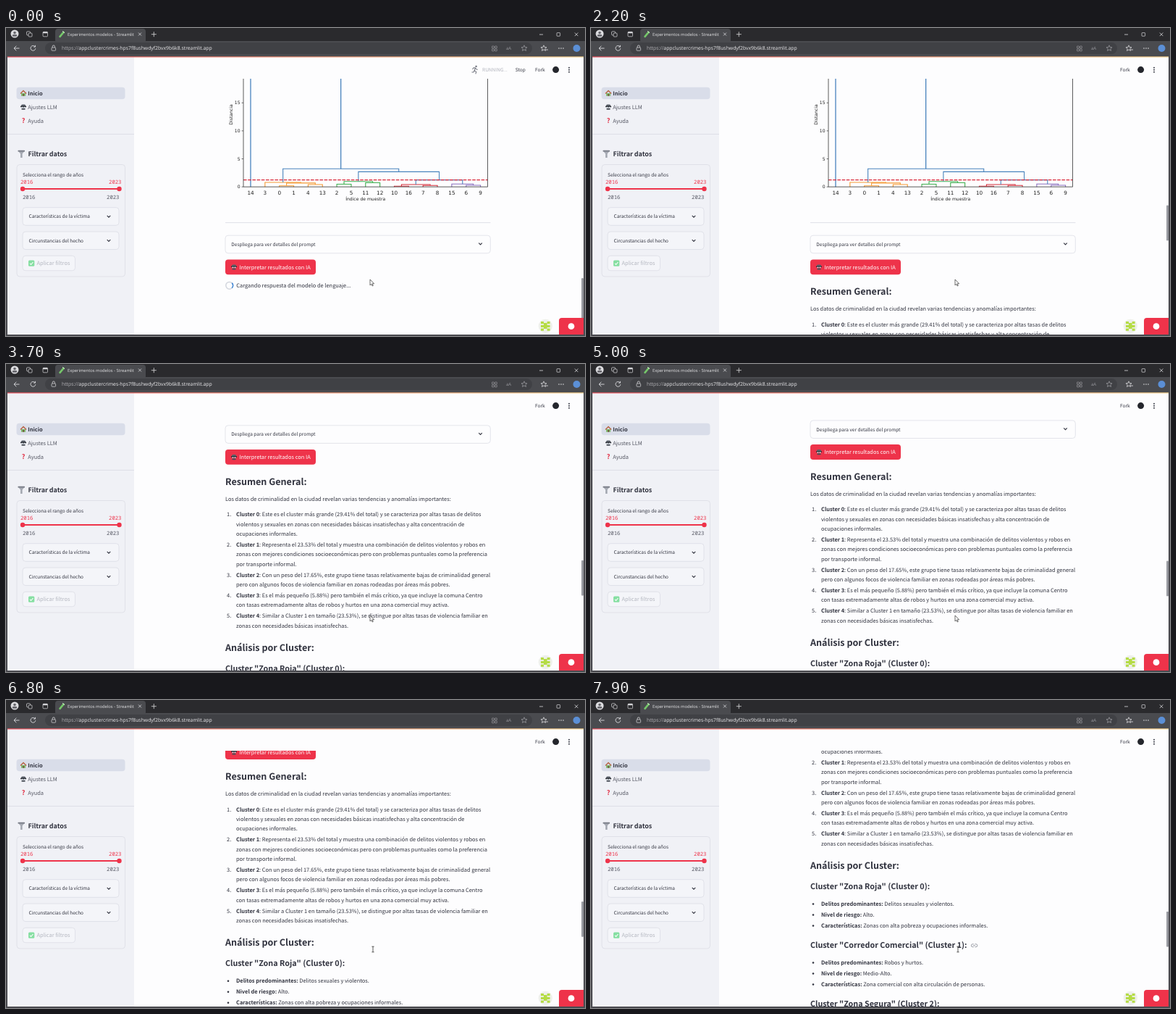
Write an HTML page that moves like this. It is 800 by 425 pixels and loops after 8000 ms.

```html
<!DOCTYPE html>
<html lang="es">
<head>
<meta charset="utf-8">
<title>Experimentos modelos</title>
<style>
  html, body { margin: 0; width: 100%; height: 100%; overflow: hidden; background: #fdfdfe; }
  svg { display: block; width: 800px; height: 425px; text-rendering: geometricPrecision; }
  .sans { font-family: "Noto Sans CJK JP", "Noto Sans CJK SC", "Noto Sans CJK", "Noto Sans", sans-serif; }
  .ui { font-family: "Open Sans", "Noto Sans", sans-serif; }
  .mono { font-family: "Noto Sans Mono", "Liberation Mono", monospace; }
  .plot { font-family: "DejaVu Sans", sans-serif; }
  .b { font-weight: 600; }
  .mid { text-anchor: middle; }
  .end { text-anchor: end; }
</style>
</head>
<body>
<svg id="stage" viewBox="0 0 800 425" xmlns="http://www.w3.org/2000/svg"></svg>
<script>
const INK = '#31333f', RED = '#ee334a', EDGE = '#d8dae2';
const LOOP = 8000, NOTCH = 41.66, NOTCH_MS = 300, ANSWER_AT = 2100;
const BODY = 8.33, SMALL = 7.29, H2 = 14.05, H3 = 12.03;

// Shape helpers. Text is placed by its visual centre line.
const label = (font, x, y, s, size, fill, cls = '') =>
  `<text class="${font} ${cls}" x="${x}" y="${y}" font-size="${size}" fill="${fill}">${s}</text>`;
const sans = (x, y, s, size = BODY, fill = INK, cls = '') =>
  label('sans', x, y + size * .33, s, size / 1.117, fill, cls);
const ui = (x, y, s, size, fill) => label('ui', x, y + size * .36, s, size, fill);
const mono = (x, y, s, fill, cls) => label('mono', x, y + 2.5, s, SMALL, fill, cls);
const plotText = (x, y, s, size, cls) => label('plot', x, y + size * .365, s, size, '#222', cls);
const rect = (x, y, w, h, fill, rx = 0, stroke = 'none') =>
  `<rect x="${x}" y="${y}" width="${w}" height="${h}" rx="${rx}" fill="${fill}" stroke="${stroke}" stroke-width=".7"/>`;
const dot = (x, y, r, fill) => `<circle cx="${x}" cy="${y}" r="${r}" fill="${fill}"/>`;
const line = (d, stroke, w = 1, extra = '') =>
  `<path d="${d}" fill="none" stroke="${stroke}" stroke-width="${w}" ${extra}/>`;
const bold = s => `<tspan class="b">${s}</tspan>`;
const chevron = (x, y) => line(`M${x - 2.3} ${y - 1.2}l2.3 2.3 2.3-2.3`, INK, 1.1);

function robot(x, y) {
  return rect(x - 3, y - 3.3, 6, 4.2, '#5c626c', 1.5) + rect(x - 4.1, y - 1.2, 8.2, 1.6, '#33363d', .6) +
    dot(x - 1.5, y + .8, .9, '#e8f0f5') + dot(x + 1.5, y + .8, .9, '#e8f0f5') +
    rect(x - 2.6, y + 1.9, 5.2, 2, '#4a4f58', .8);
}

function browser() {
  const bar = '#2a2a2d', tool = '#4a4b4f', pill = '#404145', pale = '#dcdcdf', dim = '#98989d';
  return rect(0, 0, 800, 40, bar) + rect(0, 18, 800, 22, tool) +
    rect(68, 1, 125, 20, tool, 4) + rect(54, 20, 673, 16, pill, 8) +
    dot(12, 8, 5.5, '#dcdcdf') + dot(12, 6.6, 1.8, '#66666c') + rect(8.8, 9, 6.4, 2.8, '#66666c', 1.4) +
    rect(28.5, 4.8, 5, 5, 'none', 1, pale) + rect(31, 7, 5, 5, bar, 1, pale) +
    rect(51, 5.3, 6.5, 6.5, 'none', 1, pale) + rect(51, 5.3, 6.5, 2, pale, .8) +
    line('M74.5 11.8l5-6', '#75c66a', 2.6, 'stroke-linecap="round"') + line('M78 4.3l3 2.5', '#dff0dc', 1) +
    ui(85, 8.7, 'Experimentos modelos - Streamlit', 5.82, '#e6e6e8') +
    line('M183 6.5l4 4m0-4l-4 4M200.8 8.7h7M204.3 5.2v7', pale, .8) +
    line('M737 9h5M785.8 6.5l4.6 4.6m0-4.6l-4.6 4.6', pale, .8) + rect(761, 6.6, 4.6, 4.6, 'none', .6, pale) +
    line('M18.5 28h-7.5m3.3-3.3l-3.3 3.3 3.3 3.3', pale, .9) +
    line('M40 25.6a3.4 3.4 0 1 0 .8 2.6M40.5 23.8v2.3h-2.4', pale, .9) +
    rect(63, 27, 5.6, 4.2, 'none', .7, pale) + line('M64.2 27v-1.5a1.6 1.6 0 0 1 3.2 0v1.5', pale, .8) +
    ui(77, 28, '<tspan fill="#b4b4b8">https://</tspan>appclustercrimes-hps7f8ushwdyf2bvx9b6k8.streamlit.app', 6.85, '#ececee') +
    [[671.5, 25], [675.5, 25], [671.5, 29], [675.5, 29]].map(([x, y]) => rect(x, y, 2.8, 2.8, 'none', .3, dim)).join('') +
    ui(691, 28, 'aA', 6, dim) + star(716, 28, dim) + star(743, 28, pale) + line('M745.5 30h3.5', pale, .8) +
    [-3, 0, 3].map(d => dot(767 + d, 28, .8, pale)).join('') + dot(788.5, 28, 5, '#5b8fd6');
}

function star(x, y, stroke) {
  const pts = Array.from({ length: 10 }, (_, i) => {
    const a = i * Math.PI / 5 - Math.PI / 2, r = i % 2 ? 1.9 : 4.2;
    return `${(x + r * Math.cos(a)).toFixed(1)} ${(y + r * Math.sin(a)).toFixed(1)}`;
  });
  return line(`M${pts.join('L')}Z`, stroke, .8);
}

function sidebar() {
  const picker = (y, s) => rect(23, y - 12.3, 133, 24.6, '#f4f5f9', 4, EDGE) +
    sans(31.5, y, s, SMALL) + chevron(142, y);
  return rect(2, 40, 175, 383, '#f0f1f6') + rect(14.5, 81.7, 150, 16.6, '#d9dde9', 4) +
    line('M20 90.5l4-4 4 4', '#b7603f', 1.4) + rect(21, 90, 6, 3.8, '#7fb86b') + rect(23.3, 91, 1.7, 2.8, '#745040') +
    sans(30.3, 90, 'Inicio', BODY, INK, 'b') +
    robot(24, 108.8) + sans(30.3, 109, 'Ajustes LLM', BODY, '#555763') +
    sans(24, 127.7, '?', 10, '#e0243b', 'b mid') + sans(30.3, 128, 'Ayuda', BODY, '#555763') +
    line('M2 146.5h175', EDGE, .8) +
    `<path d="M16.5 169.5h9.5l-3.4 4v5.5h-2.6v-5.5z" fill="#a5a9b2"/>` + rect(16.5, 168.7, 9.5, 1.8, '#787c86', .6) +
    sans(30.5, 174, 'Filtrar datos', 10, INK, 'b') +
    rect(15, 188.5, 149.5, 154.5, 'none', 4, EDGE) +
    sans(23, 202.5, 'Selecciona el rango de años', SMALL) +
    mono(20, 212.5, '2016', RED) + mono(159.5, 212.5, '2023', RED, 'end') +
    line('M23 222h133.5', RED, 1.9) + dot(23, 222, 3.2, RED) + dot(156.5, 222, 3.2, RED) +
    mono(23, 233, '2016', '#555763') + mono(156.5, 233, '2023', '#555763', 'end') +
    picker(260, 'Características de la víctima') + picker(293.3, 'Circunstancias del hecho') +
    rect(23, 314.3, 72.5, 20.5, '#f4f5f9', 4, EDGE) + rect(31, 320.5, 8.3, 8.3, '#86dfa2', 1.5) +
    line('M33 324.8l1.6 1.7 2.8-3.5', '#fff', 1.1) + sans(42.5, 324.6, 'Aplicar filtros', BODY, '#b4b7c0');
}

function dendrogram() {
  const blue = '#4a84bd', orange = '#f59a33', green = '#3fae4f', red = '#d3303c', purple = '#8b70bf';
  const leaf = i => 338 + 19.85 * i;
  const base = 219.2, unit = 7.73;
  const link = (a, ya, b, yb, top, c) =>
    line(`M${leaf(a)} ${ya}V${top}H${leaf(b)}V${yb}`, c, 1.1);
  const links =
    link(2, base, 3, base, 217.7, orange) + link(4, base, 5, base, 216, orange) +
    link(2.5, 217.7, 4.5, 216, 213.9, orange) + link(1, base, 3.5, 213.9, 213, orange) +
    link(6, base, 7, base, 215.5, green) + link(8, base, 9, base, 213.5, green) +
    link(6.5, 215.5, 8.5, 213.5, 211.8, green) +
    link(10, base, 11, base, 218.2, red) + link(12, base, 13, base, 217.2, red) +
    link(10.5, 218.2, 12.5, 217.2, 216, red) +
    link(15, base, 16, base, 217, purple) + link(14, base, 15.5, 217, 215.2, purple) +
    link(11.5, 216, 14.75, 215.2, 209.6, blue) + link(7.5, 211.8, 13.125, 209.6, 198.4, blue) +
    link(2.25, 213, 10.3125, 198.4, 194.2, blue) +
    line(`M${leaf(0)} ${base}V0M${leaf(6.28)} 194.2V0`, blue, 1.3);
  const names = [14, 3, 0, 1, 4, 13, 2, 5, 11, 12, 10, 16, 7, 8, 15, 6, 9];
  const ticks = [0, 5, 10, 15].map(v => {
    const y = base - v * unit;
    return line(`M325.6 ${y}h2.4`, '#333', .7) + plotText(323.5, y, v, 6.08, 'end');
  }).join('');
  return links + line('M328 209.6H665.5', '#d8283a', 1.4, 'stroke-dasharray="4.6 1.6"') +
    line(`M328 0V${base}H665.5V0`, '#333', .8) + ticks +
    names.map((n, i) => plotText(leaf(i), 227, n, 7.25, 'mid')).join('') +
    plotText(496.7, 236, 'Índice de muestra', 6.08, 'mid') +
    `<g transform="translate(310.5 119.5) rotate(-90)">${plotText(0, 0, 'Distancia', 6.08, 'mid')}</g>`;
}

const CLUSTERS = [
  [': Este es el cluster más grande (29.41% del total) y se caracteriza por altas tasas de delitos',
    'violentos y sexuales en zonas con necesidades básicas insatisfechas y alta concentración de',
    'ocupaciones informales.'],
  [': Representa el 23.53% del total y muestra una combinación de delitos violentos y robos en',
    'zonas con mejores condiciones socioeconómicas pero con problemas puntuales como la preferencia',
    'por transporte informal.'],
  [': Con un peso del 17.65%, este grupo tiene tasas relativamente bajas de criminalidad general',
    'pero con algunos focos de violencia familiar en zonas rodeadas por áreas más pobres.'],
  [': Es el más pequeño (5.88%) pero también el más crítico, ya que incluye la comuna Centro',
    'con tasas extremadamente altas de robos y hurtos en una zona comercial muy activa.'],
  [': Similar a Cluster 1 en tamaño (23.53%), se distingue por altas tasas de violencia familiar en',
    'zonas con necesidades básicas insatisfechas.']
];

function answer() {
  let y = 409, out = sans(303, 363.8, 'Resumen General:', H2, INK, 'b') +
    sans(303, 387.4, 'Los datos de criminalidad en la ciudad revelan varias tendencias y anomalías importantes:');
  CLUSTERS.forEach((rows, i) => {
    out += sans(305, y, `${i + 1}.`);
    rows.forEach((row, j) => {
      out += sans(318, y, j ? row : bold(`Cluster ${i}`) + row);
      y += 13.33;
    });
    y += 1.67;
  });
  const section = (top, title, facts) => sans(303, top, title, H3, INK, 'b') +
    facts.map(([key, value], i) => {
      const row = top + 24 + i * 15;
      return dot(307, row + .4, 1.3, INK) + sans(318, row, `${bold(key + ':')} ${value}`);
    }).join('');
  const facts = (...values) =>
    ['Delitos predominantes', 'Nivel de riesgo', 'Características'].map((k, i) => [k, values[i]]);
  return out + sans(303, 592.6, 'Análisis por Cluster:', H2, INK, 'b') +
    section(621.4, 'Cluster "Zona Roja" (Cluster 0):',
      facts('Delitos sexuales y violentos.', 'Alto.', 'Zonas con alta pobreza y ocupaciones informales.')) +
    section(702.4, 'Cluster "Corredor Comercial" (Cluster 1):',
      facts('Robos y hurtos.', 'Medio-Alto.', 'Zona comercial con alta circulación de personas.')) +
    section(782.8, 'Cluster "Zona Segura" (Cluster 2):', []) +
    `<g id="anchor">${line('M528.8 701h-1.4a2 2 0 0 0 0 4h1.4M530.4 701h1.4a2 2 0 0 1 0 4h-1.4M528 703h3.2', '#8f929c', .9)}</g>`;
}

function page() {
  return dendrogram() + line('M303 268.6H669.5', EDGE, .8) +
    rect(303, 286.2, 366.3, 24.6, '#fdfdfe', 4, EDGE) +
    sans(311.3, 298.5, 'Despliega para ver detalles del prompt', SMALL) + chevron(655.5, 297.8) +
    rect(303, 319.4, 125, 20.8, RED, 4) + robot(315, 329.7) +
    sans(322.3, 329.9, 'Interpretar resultados con IA', BODY, '#fff') +
    `<g id="loading"><circle cx="308.7" cy="355.3" r="4.9" fill="none" stroke="#d3d6de" stroke-width="1.5"/>
      <g id="spinner">${line('M312.16 351.84a4.9 4.9 0 0 1 0 6.92', '#3d86d6', 1.6)}</g>
      ${sans(318.3, 355.3, 'Cargando respuesta del modelo de lenguaje...')}</g>
    <g id="answer">${answer()}</g>`;
}

function header() {
  const runner = (id, limbs) => `<g id="${id}">${dot(649.6, 53, 1.3, '#777a84')}${line(limbs, '#777a84', 1.1)}</g>`;
  return rect(177, 40, 621, 30, '#fdfdfe') +
    `<g id="running">${runner('strideA', 'M648.5 54.8l-1.4 4 2.6 1.6-.8 3M647.1 58.8l-1.2 2.2h-2.4M644.5 57l1.6-2.2 2.4.2 1.4 2 2 .2')}
      ${runner('strideB', 'M648.5 54.8l-1.2 4 .8 4.6M647.3 58.8l-.6 2.6-2 .8M646 57.8l1-2.4 1.8.2.6 2.2 1.6.8')}
      ${sans(658, 57.6, 'RUNNING...', SMALL, '#b0b3bc')}${sans(703.7, 57.6, 'Stop', SMALL)}</g>` +
    sans(731, 57.6, 'Fork', SMALL) + dot(759.6, 57.6, 4.5, '#24262c') +
    [54.8, 57.8, 60.8].map(y => dot(778, y, .95, INK)).join('');
}

function corner() {
  const g = '#b5dc45';
  return dot(745.3, 411.3, 9.6, '#eef0ea') +
    rect(739, 405, 4, 3.2, g) + rect(747.6, 405, 4, 3.2, g) + rect(743, 407, 4.6, 8, g) +
    rect(739, 410, 12.6, 3, g) + rect(739, 414.6, 4, 3.2, g) + rect(747.6, 414.6, 4, 3.2, g) +
    `<path d="M764 423v-19a4 4 0 0 1 4-4h30v23z" fill="${RED}"/>` + dot(781, 411.7, 4.4, '#fff');
}

document.getElementById('stage').innerHTML = `
  <defs><linearGradient id="strip"><stop stop-color="#e8505c"/><stop offset="1" stop-color="#f3cf8a"/></linearGradient></defs>
  ${rect(0, 0, 800, 425, '#fdfdfe')}
  <g id="page">${page()}</g>
  ${header()}${sidebar()}
  <rect id="thumb" x="795.2" width="2.6" rx="1.3" fill="#8d8f96"/>
  ${corner()}${browser()}
  ${rect(2, 39.3, 796, 1.2, 'url(#strip)')}
  ${rect(0, 40, 2, 385, '#4b4b50')}${rect(798, 40, 2, 385, '#4b4b50')}${rect(0, 423, 800, 2, '#4b4b50')}
  <g id="arrow"><path d="M0 0v8l1.9-1.7 1.2 2.7 1.2-.5-1.2-2.7h2.5z" fill="#fff" stroke="#333" stroke-width=".7"/></g>
  <g id="beam">${line('M-1.6-3.8h3.2M0-3.8v7.6M-1.6 3.8h3.2', '#333', .8)}</g>`;

const el = id => document.getElementById(id);
const show = (id, on) => el(id).setAttribute('visibility', on ? 'visible' : 'hidden');
const move = (id, x, y) => el(id).setAttribute('transform', `translate(${x} ${y})`);

// Wheel notches: start time and direction.
const WHEEL = [
  [2950, 1], [3170, 1], [3300, 1], [3400, 1], [3523, 1],
  [4150, 1], [4350, 1], [4520, -1], [4700, -1],
  [5250, 1], [5450, 1], [5620, -1], [5800, -1],
  [6450, 1], [6770, 1], [7200, 1], [7753, 1]
];
const progress = (t, from, ms) => Math.min(1, Math.max(0, (t - from) / ms));
const easeOut = u => 1 - (1 - u) ** 2;
const scrollAt = t => NOTCH * WHEEL.reduce((sum, [at, dir]) => sum + dir * easeOut(progress(t, at, NOTCH_MS)), 0);

function draw(t) {
  const scroll = scrollAt(t), waiting = t < ANSWER_AT;
  move('page', 0, -scroll);
  show('loading', waiting);
  show('running', waiting);
  show('answer', !waiting);
  const firstStride = Math.floor(t / 200) % 2 === 0;
  show('strideA', waiting && firstStride);
  show('strideB', waiting && !firstStride);
  el('spinner').setAttribute('transform', `rotate(${t * .48} 308.7 355.3)`);
  el('thumb').setAttribute('y', waiting ? 345 : 244.5 + scroll * .13);
  el('thumb').setAttribute('height', waiting ? 76 : 49);

  const glide = progress(t, 5900, 250), overText = t >= 6000;
  move('arrow', 503 + 4 * glide, 347 - 3 * glide);
  move('beam', 507, 348 - 4 * glide);
  show('arrow', !overText);
  show('beam', overText);
  show('anchor', t >= 7850);
}

const start = performance.now();
(function tick() {
  draw((performance.now() - start) % LOOP);
  requestAnimationFrame(tick);
})();
</script>
</body>
</html>
```
